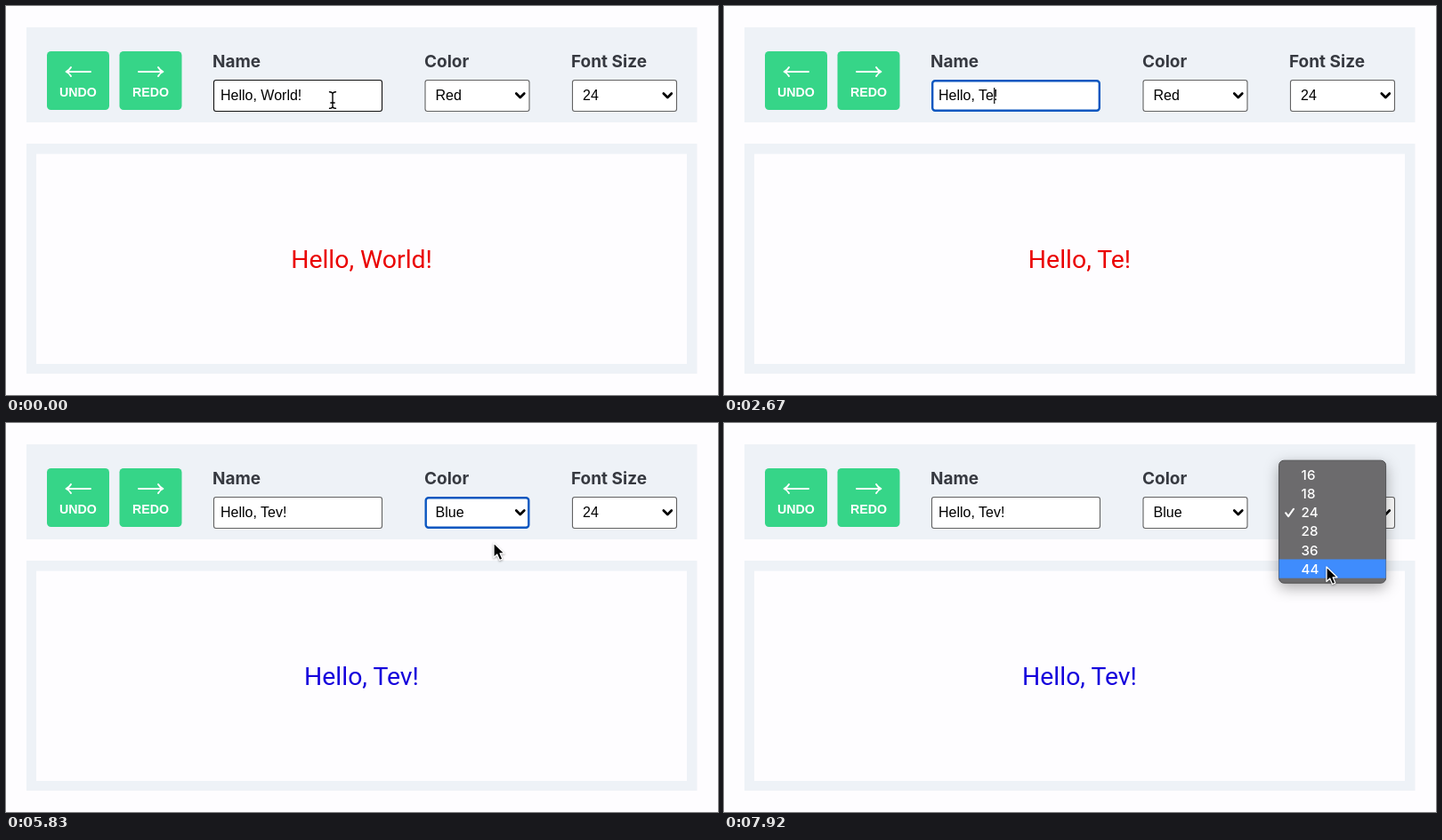
Animation, 800 px wide and 438 px high, one loop 8 s. Source, as an HTML page:

```html
<!DOCTYPE html>
<html lang="en">
<head>
<meta charset="utf-8">
<title>Undo and redo form</title>
<style>
  html, body { margin: 0; width: 100%; height: 100%; overflow: hidden; background: #fefdff; }
  svg { display: block; width: 100%; height: 100%; }
  .label { font: 700 19px Inter, sans-serif; fill: #363940; }
  .field { font: 16px "Liberation Sans", Arial, sans-serif; fill: #000; }
  .button { font: 700 14.2px "Liberation Sans", Arial, sans-serif; fill: #fff; text-anchor: middle; }
  .item { font: 500 15.2px Inter, sans-serif; fill: #fff; }
  #preview { font: 28.4px Roboto, sans-serif; text-anchor: middle; }
  .line { fill: none; stroke-linecap: round; stroke-linejoin: round; }
  .shadow { filter: drop-shadow(0 5px 8px rgba(0, 0, 0, .32)); }
</style>
</head>
<body>
<svg id="stage" viewBox="0 0 800 438" xmlns="http://www.w3.org/2000/svg">
  <path fill="#eef2f7" d="M23 24H776.5V131H23ZM23 155H776.5V414H23Z"/>
  <path fill="#fefdff" d="M34 166.5H765V403H34Z"/>

  <g fill="#36d588">
    <rect x="46" y="51" width="70" height="66" rx="4.5"/>
    <rect x="127.5" y="51" width="70" height="66" rx="4.5"/>
  </g>
  <g class="line" stroke="#fff" stroke-width="1.9">
    <path d="M95 74H68M73 69Q71 72.5 67.5 74Q71 75.5 73 79"/>
    <path d="M149 74H176M171 69Q173 72.5 176.5 74Q173 75.5 171 79"/>
  </g>
  <text class="button" x="81" y="101.5">UNDO</text>
  <text class="button" x="162.5" y="101.5">REDO</text>

  <text class="label" x="232" y="68.5">Name</text>
  <text class="label" x="470" y="68.5">Color</text>
  <text class="label" x="635" y="68.5">Font Size</text>

  <g id="boxes" fill="#fff"></g>
  <rect id="selection" y="91.5" height="19" fill="#b3d7ff"/>
  <text id="name" class="field" x="241" y="106.3"></text>
  <path id="caret" stroke="#000" stroke-width="1.2"/>
  <text id="color" class="field" x="482.5" y="106.3"></text>
  <text class="field" x="648" y="106.3">24</text>
  <path class="line" stroke="#000" stroke-width="2.7" stroke-linecap="butt"
        d="M573.3 98.5L577.8 103L582.3 98.5M738.8 98.5L743.3 103L747.8 98.5"/>

  <text id="preview" x="399.5" y="295"></text>
  <g id="menus"></g>

  <g id="beam" class="line">
    <g id="beamShape">
      <path id="beamPath" d="M-3.5 -9.3Q0 -9.3 0 -6.5Q0 -9.3 3.5 -9.3M0 -6.5V6.5M-3.5 9.3Q0 9.3 0 6.5Q0 9.3 3.5 9.3M-2.2 3H2.2"
            stroke="#fff" stroke-width="3" stroke-opacity=".75"/>
      <use href="#beamPath"/>
    </g>
  </g>
  <path id="arrow" d="M0 0V16.5L3.8 13L6.6 19.5L9.8 18.1L7.1 11.8H12Z"
        fill="#000" stroke="#fff" stroke-width="1.3" stroke-linejoin="round"
        style="filter:drop-shadow(0 1px 1px rgba(0,0,0,.35))"/>
</svg>
<script>
const LOOP = 8000;
const ROW = 21.25;
const SVG = "http://www.w3.org/2000/svg";
const $ = id => document.getElementById(id);

function add(parent, tag, attrs, text) {
  const node = document.createElementNS(SVG, tag);
  set(node, attrs);
  if (text) node.textContent = text;
  return parent.appendChild(node);
}
function set(node, attrs) {
  for (const key in attrs) node.setAttribute(key, attrs[key]);
}
function show(node, visible) {
  node.style.display = visible ? "" : "none";
}

// The I-beam gets a dark core over its light halo.
$("beamShape").lastElementChild.remove();
const core = $("beamPath").cloneNode();
core.removeAttribute("id");
set(core, { stroke: "#000", "stroke-width": 1.4, "stroke-opacity": 1 });
$("beamShape").append(core);

const boxes = [[233, 190], [470.5, 118], [636, 118]].map(([x, width]) => ({
  x, width, node: add($("boxes"), "rect", {})
}));

function makeMenu(x, y, items, checked) {
  const group = add($("menus"), "g", {});
  const height = items.length * ROW + 10.5;
  add(group, "rect", { class: "shadow", x, y, width: 120, height, rx: 5.5,
    fill: "#6c6b6d", stroke: "#505052", "stroke-width": 1 });
  const bar = add(group, "rect", { x, width: 120, height: ROW, fill: "#3f8cfd" });
  items.forEach((item, i) =>
    add(group, "text", { class: "item", x: x + 25, y: y + 21.3 + i * ROW }, item));
  const checkY = y + 16 + checked * ROW;
  add(group, "path", { class: "line", stroke: "#fff", "stroke-width": 2,
    d: `M${x + 7.5} ${checkY + .5}l3 4l6 -8.5` });
  return { group, bar, top: y + 5, count: items.length };
}
const colorMenu = makeMenu(458.3, 84.3, ["Red", "Green", "Blue"], 0);
const sizeMenu = makeMenu(623.6, 42.2, ["16", "18", "24", "28", "36", "44"], 2);

// Pointer hot spot: time, x, y
const pointer = [
  [0, 367, 106], [80, 367, 106], [800, 301, 105], [3000, 301, 105],
  [3620, 592, 102], [3960, 574, 97], [4300, 574, 97], [4880, 548, 135],
  [6200, 548, 135], [6580, 677, 119], [6900, 677, 106], [7200, 677, 106],
  [7800, 677, 162], [LOOP, 677, 162]
];
function pointerAt(t) {
  const i = pointer.findIndex(p => p[0] > t);
  const [t0, x0, y0] = pointer[i - 1], [t1, x1, y1] = pointer[i];
  const u = (t - t0) / (t1 - t0), ease = u * u * (3 - 2 * u);
  return [x0 + (x1 - x0) * ease, y0 + (y1 - y0) * ease];
}

const typing = [[0, "World"], [2170, "T"], [2420, "Te"], [2920, "Tev"]];
const between = (t, from, to) => t >= from && t < to;

function drawBoxes(focused, hovered) {
  boxes.forEach(({ x, width, node }, i) => {
    const focus = i === focused, inset = focus ? 1.2 : .5;
    set(node, {
      x: x + inset, y: 83 + inset, width: width - 2 * inset, height: 36 - 2 * inset,
      rx: focus ? 3 : 2.5, stroke: focus ? "#0b57c0" : i === hovered ? "#111" : "#626262",
      "stroke-width": focus ? 2.4 : 1.1
    });
  });
}

function drawMenu(menu, visible, y) {
  show(menu.group, visible);
  const row = Math.max(0, Math.min(menu.count - 1, Math.floor((y - menu.top) / ROW)));
  menu.bar.setAttribute("y", menu.top + row * ROW);
}

function render(t) {
  const [x, y] = pointerAt(t);
  const step = typing.filter(s => s[0] <= t).pop();
  const word = step[1];
  const blue = t >= 5580;
  const colorOpen = between(t, 4250, 5540);
  const sizeOpen = t >= 7120;
  const name = `Hello, ${word}!`;

  $("name").textContent = name;
  $("preview").textContent = name;
  $("preview").setAttribute("fill", blue ? "#1400dc" : "#ea0000");
  $("color").textContent = blue ? "Blue" : "Red";

  const nameFocus = between(t, 830, 4250);
  const colorFocus = between(t, 5540, 7120);
  const inside = boxes.findIndex(b => x >= b.x && x <= b.x + b.width && y >= 83 && y <= 119);
  drawBoxes(nameFocus ? 0 : colorFocus ? 1 : -1, colorOpen || sizeOpen ? -1 : inside);

  const start = 241 + $("name").getSubStringLength(0, 7);
  const end = 241 + $("name").getSubStringLength(0, 7 + word.length);
  show($("selection"), between(t, 1250, 2170));
  set($("selection"), { x: start, width: end - start });
  $("caret").setAttribute("d", `M${end + .8} 92V110`);
  const blinkOn = t < 3420 || (t - 3420) % 1000 >= 500;
  show($("caret"), between(t, 2170, 4250) && blinkOn);

  drawMenu(colorMenu, colorOpen, y);
  drawMenu(sizeMenu, sizeOpen, y);

  const hidden = between(t, 2170, 3000);
  const overText = inside === 0;
  show($("beam"), !hidden && overText);
  show($("arrow"), !hidden && !overText);
  set($("beam"), { transform: `translate(${x} ${y})` });
  set($("arrow"), { transform: `translate(${x} ${y})` });
}

const began = performance.now();
function tick() {
  render((performance.now() - began) % LOOP);
  requestAnimationFrame(tick);
}
tick();
</script>
</body>
</html>
```
